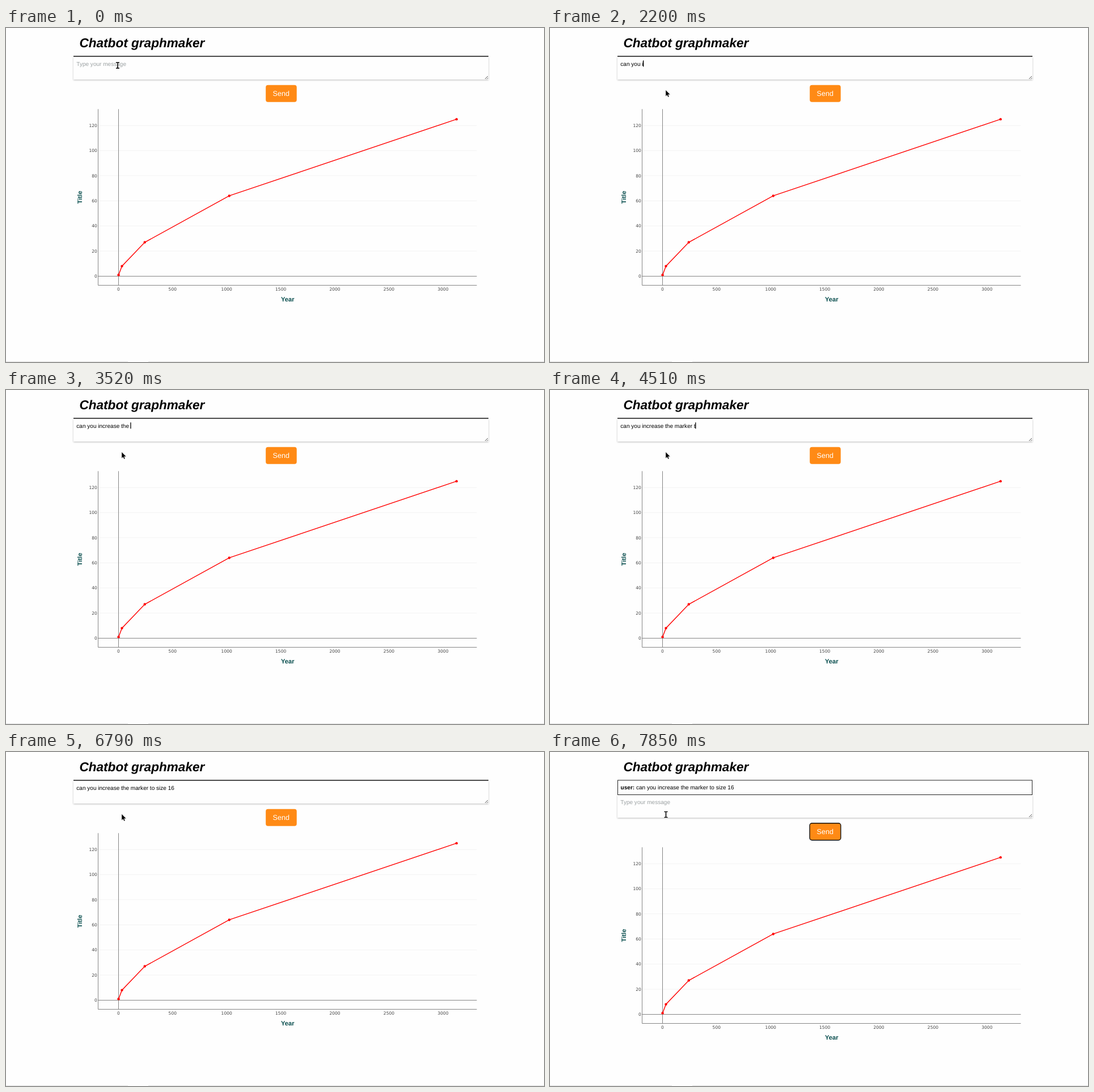
An HTML page that plays this animation: 949x590 px, repeating every 8000 ms.

```html
<!DOCTYPE html>
<html lang="en">
<head>
<meta charset="utf-8">
<title>Chatbot graphmaker</title>
<style>
  html, body { margin: 0; width: 100%; height: 100%; overflow: hidden; background: #fefefe; }
  svg { display: block; font-family: "Liberation Sans", Arial, sans-serif; }
  text { white-space: pre; text-rendering: geometricPrecision; }
  .small { font-size: 10.06px; }
  .bold { font-weight: bold; }
  .hint { fill: #9ca2a3; }
  .tick { font: 7.55px "DejaVu Sans", Verdana, sans-serif; fill: #444; }
  .axis { font-size: 11.2px; font-weight: bold; fill: #0a4f4f; text-anchor: middle; }
  .field { fill: #fefefe; filter: drop-shadow(0 1.3px 1.5px #0004); }
</style>
</head>
<body>
<svg width="949" height="590" viewBox="0 0 949 590">
  <text x="129.4" y="34" font-size="22.6" font-weight="bold" font-style="italic">Chatbot graphmaker</text>
  <path d="M0 589.5H215M251 589.5H949" stroke="#e1e1e1"/>

  <g id="page">
    <rect class="field" x="119" y="51" width="732" height="40"/>
    <path d="M845 90L850 85M848 90.3L850.3 88" stroke="#555" fill="none"/>
    <text id="hint" class="small hint" x="124.3" y="66.5">Type your message</text>
    <text id="typed" class="small" x="124.3" y="66.5"></text>
    <rect id="caret" y="57.3" width="1.3" height="11"/>
    <rect x="458.2" y="100.8" width="54.6" height="30" rx="4" fill="#ff8a15"/>
    <rect id="ring" x="458.1" y="100.7" width="54.8" height="30" rx="4" fill="none" stroke="#101010" stroke-width="1.4"/>
    <text x="485.2" y="120.3" font-size="12.6" fill="#fff" text-anchor="middle">Send</text>
    <g id="chart"></g>
    <text class="axis" x="496.8" y="482.8">Year</text>
    <text class="axis" transform="translate(134 299) rotate(-90)">Title</text>
  </g>

  <path id="rule" d="M119 50H851" stroke="#111" stroke-width="1.5"/>
  <g id="log">
    <rect x="119.5" y="49.9" width="731" height="25.6" fill="#fefefe" stroke="#222"/>
    <text class="small" x="124.6" y="65.7"><tspan class="bold">user:</tspan><tspan id="sent"></tspan></text>
  </g>

  <path id="arrow" d="M0 0V11L2.5 8.8 4.3 12.5 6.1 11.7 4.4 8.1 7.9 7.8Z" stroke="#fff" stroke-width=".4"/>
  <g id="beam" fill="none">
    <path d="M-3-5H3M0-5V5M-3 5H3" stroke="#fff" stroke-width="3"/>
    <path d="M-3-5H-.8L0-4.4 .8-5H3M0-4.6V4.6M-3 5H-.8L0 4.4 .8 5H3" stroke="#000" stroke-width="1.6"/>
  </g>
</svg>
<script>
const $ = id => document.getElementById(id);
const LOOP = 8000, FOCUS = 6990, HOVER = 7780, SENT = 7850;
const message = "can you increase the marker to size 16";

// Moment at which each character of the message appears
const keys = [
  650, 720, 920, 1010, 1110, 1250, 1330, 1670,
  2200, 2270, 2400, 2600, 2710, 2800, 2930, 3000, 3130,
  3260, 3260, 3390, 3520, 3790, 3850, 3990, 4100, 4200, 4300, 4410,
  4510, 4580, 4650, 5130, 5270, 5380, 5460, 5600, 5860, 6260
];

const px = x => 198.4 + x * 0.19083;
const py = y => 438.4 - y * 2.218;

function drawChart() {
  let out = "";
  const line = (d, color, width = 1) =>
    out += `<path d="${d}" fill="none" stroke="${color}" stroke-width="${width}"/>`;
  const tick = (x, y, label, anchor) =>
    out += `<text class="tick" x="${x}" y="${y}" text-anchor="${anchor}">${label}</text>`;

  for (let y = 0; y <= 120; y += 20) {
    if (y) line(`M163 ${py(y)}H830.5`, "#f3f3f3");
    tick(160.9, py(y) + 2.7, y, "end");
  }
  for (let x = 0; x <= 3000; x += 500) tick(px(x), 464.2, x, "middle");

  line("M198.5 143.3V454.5M162.5 438.5H830.5", "#858585");
  line("M162.5 143.3V454.5H830.5", "#858585");

  const points = [1, 2, 3, 4, 5].map(n => [px(n ** 5), py(n ** 3)]);
  line("M" + points.join("L"), "#f00", 1.4);
  for (const [x, y] of points) out += `<circle cx="${x}" cy="${y}" r="2.2" fill="#f00"/>`;
  $("chart").innerHTML = out;
}

const show = (id, on) => $(id).setAttribute("visibility", on ? "visible" : "hidden");
const place = (id, x, y) => $(id).setAttribute("transform", `translate(${x} ${y})`);

function render(t) {
  const sent = t >= SENT;
  const count = sent ? 0 : keys.filter(k => k <= t).length;
  const typed = $("typed");
  typed.textContent = message.slice(0, count);
  show("hint", !count);
  show("caret", count && t < 6790);
  $("caret").setAttribute("x", 123.8 + (count ? typed.getComputedTextLength() : 0));

  show("ring", t >= FOCUS);
  show("log", sent);
  show("rule", !sent);
  place("page", 0, sent ? 25 : 0);

  const beam = t < 260 || t >= HOVER;
  show("beam", beam);
  show("arrow", !beam);
  if (t < 260) place("beam", 197, 66);
  else place("beam", 204.5, 110.5);
  if (t < 320) place("arrow", 207.5, 100);
  else place("arrow", 204, 109.6);
}

drawChart();
$("sent").textContent = " " + message;
const frame = () => {
  render(performance.now() % LOOP);
  requestAnimationFrame(frame);
};
frame();
</script>
</body>
</html>
```
